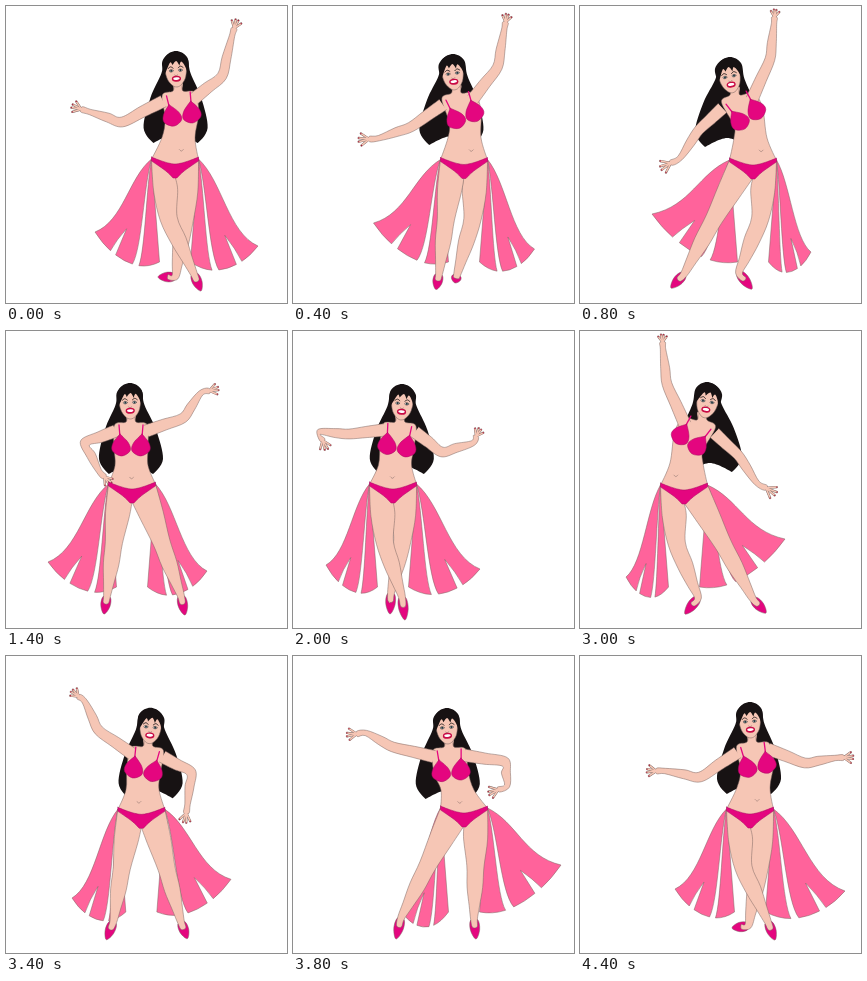
Recreate the animation shown at these times as an HTML page with a canvas. Size 281 by 297 pixels, loop 4600 ms.

```html
<!DOCTYPE html>
<html lang="en">
<head>
<meta charset="utf-8">
<title>Dancer</title>
<style>
html, body { margin: 0; width: 100%; height: 100%; overflow: hidden; background: #fff; }
canvas { display: block; width: 100vw; height: 100vh; }
</style>
</head>
<body>
<canvas id="stage"></canvas>
<script>
const W = 281, H = 297, STEP = 200, COUNT = 23, MIRROR = 277;
const SKIN = '#f6c6b5', PINK = '#e4067f', CLOTH = '#ff639b', HAIR = '#171213', LINE = '#7a6460';

// body: face, neck, chest, pelvis
// left, right: elbow, wrist, fingertip, ankle, toe, skirt corner
const cross = {
  body: [170,67, 172,86, 176,110, 169,153],
  left: [116,116, 84,106, 65,100, 188,268, 195,285, 89,226],
  right: [216,70, 226,30, 231,13, 169,271, 152,271, 252,240]
};
const reach = {
  body: [150,73, 155,90, 168,110, 173,154],
  left: [119,124, 100,152, 80,163, 104,268, 91,282, 72,208],
  right: [190,53, 194,18, 195,3, 159,267, 172,283, 231,246]
};
const hip = {
  body: [124,74, 125,92, 125,116, 126,153],
  left: [79,112, 93,140, 105,153, 101,265, 98,283, 42,231],
  right: [177,87, 195,62, 213,57, 175,265, 179,284, 201,240]
};
const sway = {
  body: [123,74, 121,92, 119,116, 106,152],
  left: [65,106, 63,130, 82,138, 96,263, 94,283, 9,209],
  right: [177,91, 204,77, 224,79, 169,262, 174,283, 168,256]
};
const close = {
  body: [109,75, 107,92, 104,115, 100,153],
  left: [56,103, 26,101, 34,119, 109,266, 112,289, 33,234],
  right: [149,121, 180,112, 187,97, 98,262, 97,283, 187,238]
};
const wide = {
  body: [107,68, 105,87, 100,110, 107,153],
  left: [52,107, 22,102, 3,101, 109,270, 125,272, 12,235],
  right: [157,121, 192,115, 211,115, 89,266, 82,284, 182,233]
};

// The second half of the dance repeats the first one mirrored.
const flipX = list => list.map((v, i) => i % 2 ? v : MIRROR - v);
const mirror = ({ body, left, right }) => ({ body: flipX(body), left: flipX(right), right: flipX(left) });
const half = [[4, reach], [7, hip], [8, sway], [10, close], [11, wide]];
const keys = [[0, cross], ...half, [12.45, mirror(cross)],
  ...half.map(([at, pose]) => [at + 11, mirror(pose)]), [COUNT, cross]];

const pairs = list => Array.from({ length: list.length / 2 }, (_, i) => [list[2 * i], list[2 * i + 1]]);
const add = (p, x, y) => [p[0] + x, p[1] + y];
const mix = (a, b, k) => [a[0] + (b[0] - a[0]) * k, a[1] + (b[1] - a[1]) * k];
const mixAll = (a, b, k) => a.map((p, i) => mix(p, b[i], k));

// Point in the tilted frame of the upper body: x across, y down from the neck.
function torsoPoint([, neck, chest], x, y, share = 1) {
  const tilt = share * Math.atan2(chest[0] - neck[0], chest[1] - neck[1]);
  return add(neck, x * Math.cos(tilt) + y * Math.sin(tilt), y * Math.cos(tilt) - x * Math.sin(tilt));
}

function rig(pose) {
  const body = pairs(pose.body);
  const side = (list, s) => [torsoPoint(body, s * 15.5, 8, 0.5), ...pairs(list)];
  return { body, left: side(pose.left, -1), right: side(pose.right, 1) };
}

// Arms swing: every bone turns and changes length instead of sliding.
function mixSide(a, b, k) {
  const joints = mixAll(a, b, k);
  for (let i = 1; i <= 3; i++) {
    const [u, v] = [a, b].map(side => [side[i][0] - side[i - 1][0], side[i][1] - side[i - 1][1]]);
    const turn = Math.atan2(u[0] * v[1] - u[1] * v[0], u[0] * v[0] + u[1] * v[1]);
    const angle = Math.atan2(u[1], u[0]) + turn * k;
    const length = Math.hypot(...u) * (1 - k) + Math.hypot(...v) * k;
    joints[i] = add(joints[i - 1], Math.cos(angle) * length, Math.sin(angle) * length);
  }
  return joints;
}

function poseAt(step) {
  const next = keys.findIndex(([at]) => at > step);
  const [[t0, from], [t1, to]] = [keys[next - 1], keys[next]];
  const a = rig(from), b = rig(to), k = (step - t0) / (t1 - t0);
  return { body: mixAll(a.body, b.body, k), left: mixSide(a.left, b.left, k), right: mixSide(a.right, b.right, k) };
}

const canvas = document.getElementById('stage');
const ctx = canvas.getContext('2d');

// Smooth curve through the points; corner indices stay sharp.
function curve(points, corners = [], closed = true) {
  const n = points.length, path = new Path2D();
  const tangent = i => {
    if (corners.includes(i) || (!closed && (i === 0 || i === n - 1))) return [0, 0];
    const a = points[(i + n - 1) % n], b = points[(i + 1) % n];
    return [(b[0] - a[0]) * 0.17, (b[1] - a[1]) * 0.17];
  };
  path.moveTo(...points[0]);
  for (let i = 0; i < (closed ? n : n - 1); i++) {
    const j = (i + 1) % n, p = points[i], q = points[j], u = tangent(i), v = tangent(j);
    path.bezierCurveTo(p[0] + u[0], p[1] + u[1], q[0] - v[0], q[1] - v[1], ...q);
  }
  return path;
}

function paint(path, fill, line = LINE, width = 0.5) {
  if (fill) { ctx.fillStyle = fill; ctx.fill(path); }
  if (line) { ctx.strokeStyle = line; ctx.lineWidth = width; ctx.stroke(path); }
}

const stroke = (points, color, width) => paint(curve(points, [], false), null, color, width);

function ellipse(x, y, rx, ry, fill, line = null) {
  const path = new Path2D();
  path.ellipse(x, y, rx, ry, 0, 0, 7);
  paint(path, fill, line);
}

// One edge of a tube around a line of joints; sign 1 or -1 picks the edge.
const edge = (joints, radii, sign) => joints.map((p, i) => {
  const a = joints[Math.max(i - 1, 0)], b = joints[Math.min(i + 1, joints.length - 1)];
  const dx = b[0] - a[0], dy = b[1] - a[1], k = sign * radii[i] / (Math.hypot(dx, dy) || 1);
  return add(p, -dy * k, dx * k);
});

const tube = (joints, radii) =>
  paint(curve([...edge(joints, radii, 1), ...edge(joints, radii, -1).reverse()], [], false), SKIN);

// A slit outer panel and a narrow inner strip, fanned out from the hip.
function drawSkirt(hipSide, corner, s) {
  const end = [hipSide[0] - s * 8, 256];
  const hem = u => add(mix(corner, end, u), 0, 15 * Math.sin(Math.PI * u) ** 0.7);
  const path = new Path2D();
  const fall = (u, back) => {
    const to = hem(u), at = (kx, ky) => [mix(hipSide, to, kx)[0], mix(hipSide, to, ky)[1]];
    const bend = [at(0.4, 0.25), at(0.5, 0.85)];
    if (back) path.bezierCurveTo(...bend[1], ...bend[0], ...hipSide);
    else path.bezierCurveTo(...bend[0], ...bend[1], ...to);
  };
  const hemTo = (a, b) => path.quadraticCurveTo(...add(hem((a + b) / 2), 0, 1), ...hem(b));
  path.moveTo(...hipSide);
  fall(0);
  hemTo(0, 0.24);
  const slit = mix(hipSide, hem(0.34), 0.72);
  path.quadraticCurveTo(...add(mix(hem(0.24), slit, 0.5), s * 2, 0), ...slit);
  path.lineTo(...hem(0.32));
  hemTo(0.32, 0.58);
  fall(0.58, true);
  fall(0.68);
  hemTo(0.68, 1);
  path.lineTo(...hipSide);
  paint(path, CLOTH);
}

function drawHair([face, neck, chest]) {
  const drift = (neck[0] - chest[0]) * 0.6;
  const lock = s => {
    const temple = add(face, s * 14.5, 0), tail = add(neck, s * 32 + drift, 36);
    return [add(face, s * 11, -16), temple, add(mix(temple, tail, 0.45), s * 3, 0), tail, add(tail, -s * 10, 15)];
  };
  paint(curve([add(face, 0, -22), ...lock(1), add(neck, drift, 42), ...lock(-1).reverse()], [5, 7]), HAIR, null);
}

function drawArm([shoulder, elbow, wrist, tip]) {
  const dx = tip[0] - wrist[0], dy = tip[1] - wrist[1];
  const palm = mix(wrist, tip, 0.45);
  const fingers = [-0.26, -0.07, 0.1, 0.3].map(s => {
    const stretch = 1 - Math.abs(s) * 0.6;
    return [wrist[0] + dx * stretch - dy * s, wrist[1] + dy * stretch + dx * s];
  });
  fingers.forEach(f => stroke([palm, f], LINE, 2.3));
  tube([shoulder, mix(shoulder, elbow, 0.5), elbow, mix(elbow, wrist, 0.45), wrist, palm],
    [6.2, 5.6, 4.9, 4.5, 2.7, 2.7]);
  fingers.forEach(f => {
    stroke([palm, f], SKIN, 1.5);
    ellipse(...f, 0.7, 0.7, '#a51d3c');
  });
}

// Knees bow outwards when the foot crosses inwards.
function drawLeg(hipSide, crotch, ankle, toe, s) {
  const top = mix(hipSide, crotch, 0.5);
  const knee = add(mix(top, ankle, 0.48), s * 0.3 * Math.max(0, s * (top[0] - ankle[0])), 0);
  const dx = toe[0] - ankle[0], dy = toe[1] - ankle[1], length = Math.hypot(dx, dy);
  const foot = (along, across) =>
    add(ankle, dx * along - dy / length * across, dy * along + dx / length * across);
  paint(curve([foot(0.05, 3.6), foot(0.55, 4.6), toe, foot(0.55, -4.6), foot(0.05, -3.6)]), PINK);
  const joints = [mix(top, knee, 0.45), knee, mix(knee, ankle, 0.4), mix(knee, ankle, 0.75), ankle, foot(0.4, 0)];
  const radii = [12, 8.6, 7.8, 5.2, 3.4, 2.4];
  paint(curve([hipSide, ...edge(joints, radii, -s), ...edge(joints, radii, s).reverse(), crotch], [], false), SKIN);
}

function drawTorso(body, sides, crotch) {
  const [, neck, chest, pelvis] = body;
  const flanks = sides.map(({ s, joints, hipSide }) => [
    add(neck, s * 4.5, -9), add(neck, s * 5, -1), add(joints[0], s, -6),
    torsoPoint(body, s * 17, 24), add(mix(chest, pelvis, 0.5), s * 16.5, 0), hipSide]);
  paint(curve([...flanks[0], crotch, ...flanks[1].slice().reverse()], [5, 6, 7]), SKIN, null);
  flanks.forEach(points => stroke(points, LINE, 0.5));
  const navel = add(mix(chest, crotch, 0.55), (chest[0] - neck[0]) * 0.8, 0);
  stroke([add(navel, -2, 0), add(navel, 0, 1.5), add(navel, 2, 0)], LINE, 0.5);
}

function drawSuit(body, sides, crotch) {
  for (const { s } of sides) {
    const at = (x, y) => torsoPoint(body, s * x, y);
    stroke([at(12, 2), at(11, 14)], PINK, 1.3);
    paint(curve([at(11, 11), at(18, 20), at(18.5, 28), at(9.5, 33), at(1, 28), at(2.5, 20)], [0]), PINK, '#a20b5c');
  }
  const [a, b] = sides.map(side => side.hipSide), pelvis = body[3];
  const cut = h => add(mix(h, crotch, 0.6), 0, 1);
  paint(curve([add(a, 0, -2), add(pelvis, 0, 5), add(b, 0, -2), add(b, 0, 2), cut(b),
    add(crotch, 2, 1), add(crotch, -2, 1), cut(a), add(a, 0, 2)], [0, 2, 3, 5, 6, 8]), PINK, '#a20b5c');
}

function drawHead([face, neck]) {
  ctx.save();
  ctx.translate(...face);
  ctx.rotate(Math.atan2(face[0] - neck[0], neck[1] - face[1]) * 0.7);
  paint(curve([[-10, -8], [-9.5, 4], [-5, 11.5], [0, 14], [5, 11.5], [9.5, 4], [10, -8], [0, -15]]), SKIN);
  paint(curve([[-12, 2], [-13, -12], [-5, -20], [5, -20], [13, -12], [12, 2], [9.5, -6], [6, -11],
    [4, -7], [1, -12], [-3, -8], [-5, -11], [-9.5, -3]], [0, 5, 8, 10]), HAIR, null);
  for (const s of [-1, 1]) {
    stroke([[s * 2.5, -5], [s * 5, -6.5], [s * 7.5, -5]], HAIR, 0.8);
    ellipse(s * 4.6, -2.5, 2, 1.2, '#fff', HAIR);
    ellipse(s * 4.6, -2.5, 1, 1.1, '#26383f');
  }
  stroke([[-1.4, 2], [0, 2.8], [1.4, 2]], LINE, 0.6);
  ellipse(0, 5.8, 4.6, 3, '#c90b45');
  ellipse(0, 5.6, 3.2, 1.4, '#fff');
  ctx.restore();
}

function drawPose({ body, left, right }) {
  const pelvis = body[3], crotch = add(pelvis, 0, 18);
  const sides = [[-1, left], [1, right]].map(([s, joints]) =>
    ({ s, joints, hipSide: add(pelvis, s * 23.5, 0) }));
  sides.forEach(({ s, joints, hipSide }) => drawSkirt(hipSide, joints[6], s));
  drawHair(body);
  const legs = left[5][1] > right[5][1] ? sides.slice().reverse() : sides;
  legs.forEach(({ s, joints, hipSide }) => drawLeg(hipSide, crotch, joints[4], joints[5], s));
  drawTorso(body, sides, crotch);
  sides.forEach(({ joints }) => drawArm(joints));
  drawSuit(body, sides, crotch);
  drawHead(body);
}

const steps = Array.from({ length: COUNT }, (_, i) => poseAt(i));
const start = performance.now();

function tick() {
  const ratio = window.devicePixelRatio || 1;
  canvas.width = innerWidth * ratio;
  canvas.height = innerHeight * ratio;
  ctx.scale(canvas.width / W, canvas.height / H);
  ctx.lineJoin = ctx.lineCap = 'round';
  ctx.fillStyle = '#fff';
  ctx.fillRect(0, 0, W, H);
  drawPose(steps[Math.floor((performance.now() - start) / STEP) % COUNT]);
  requestAnimationFrame(tick);
}
tick();
</script>
</body>
</html>
```
